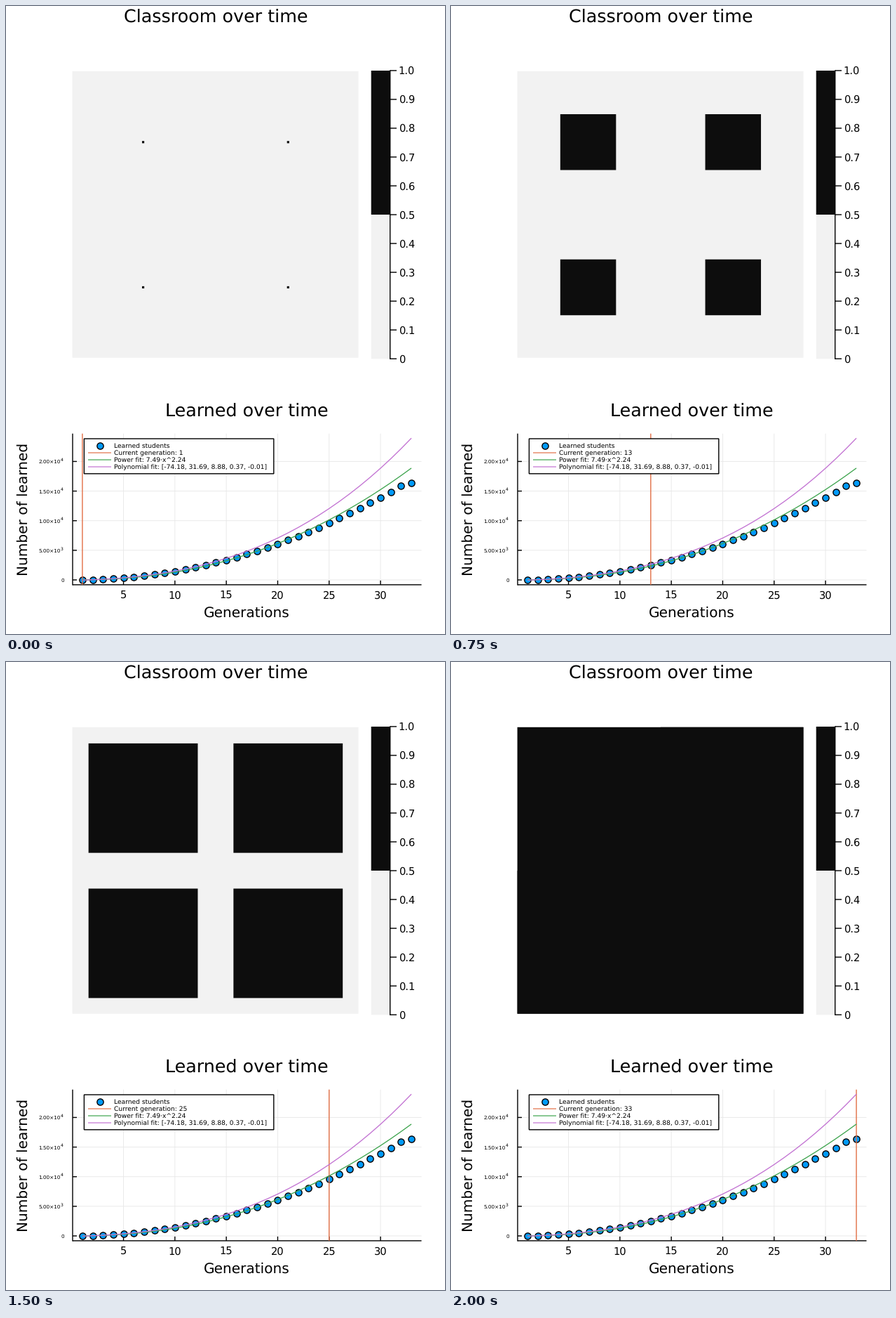
Write a matplotlib script that moves like this. It is 626 by 894 pixels and loops after 2060 ms.

```python
import numpy as np
import matplotlib.pyplot as plt
from matplotlib.animation import FuncAnimation
from matplotlib.patches import Rectangle

W, H, LOOP = 626, 894, 2060
GENS, CELLS = 33, 128
PX = 0.72  # points per pixel at 100 dpi

DARK, LIGHT = "#0d0d0d", "#f2f2f2"
BLUE, ORANGE, GREEN, PURPLE = "#009afa", "#e26f46", "#3da44d", "#c271d2"
TITLE, GUIDE, TICK, LEGEND, SMALL = 25.4, 20.1, 14.6, 9.1, 7.3

plt.rcParams.update({"font.family": "DejaVu Sans", "text.hinting": "none"})
fig = plt.figure(figsize=(W / 100, H / 100), dpi=100, facecolor="white")
ax = fig.add_axes([0, 0, 1, 1])
ax.set_xlim(0, W)
ax.set_ylim(H, 0)
ax.axis("off")


def line(xs, ys, color="black", width=1.4, z=2):
    return ax.plot(xs, ys, color=color, lw=width * PX, zorder=z,
                   snap=False, solid_capstyle="butt")[0]


def box(x0, y0, x1, y1, color, z=1, **kw):
    kw.setdefault("lw", 0)
    return ax.add_patch(Rectangle((x0, y0), x1 - x0, y1 - y0, fc=color,
                                  zorder=z, snap=False, **kw))


def text(x, y, s, size, ha="center", z=9):
    return ax.text(x, y, s, fontsize=size * PX, ha=ha, va="baseline", zorder=z)


def dots(xs, ys, z):
    ax.scatter(xs, ys, s=(9.2 * PX) ** 2, c=BLUE, edgecolors="black",
               linewidths=1.4 * PX, zorder=z, snap=False)


# Classroom heatmap; the outer cells reach slightly past the grid
def span(center, half, origin):
    lo, hi = np.clip([center - half, center + half], -0.25, CELLS)
    return origin + 3.18 * lo, 3.18 * (hi - lo)


text(299.5, 23, "Classroom over time", TITLE)
box(94.6, 92.8, 502.5, 500.7, LIGHT)
centers = [(cx, cy) for cx in (31.5, 96.5) for cy in (31.5, 96.5)]
squares = [box(0, 0, 0, 0, DARK, 2) for _ in centers]

# Colour bar
BAR = 547.7
box(520.7, 92, BAR, 297, DARK)
box(520.7, 297, BAR, 502.3, LIGHT)
line([BAR, BAR], [91.4, 502.9])
for i in range(11):
    y = 502.2 - 41.03 * i
    line([BAR, 557], [y, y])
    text(559.6, y + 5.3, f"{i / 10:.1f}" if i else "0", TICK, "left")


# Learned students chart
def gx(g):
    return 94.25 + 14.66 * np.asarray(g, float)


def gy(n):
    return 817 - 0.00843 * np.asarray(n, float)


LEFT, RIGHT, TOP, BOTTOM = 95, 592.5, 608.7, 823.9

text(343, 584, "Learned over time", TITLE)
text(343.5, 870, "Generations", GUIDE)
ax.text(31, 716, "Number of learned", fontsize=GUIDE * PX, rotation=90,
        rotation_mode="anchor", ha="center", va="baseline")

for g in range(5, 31, 5):
    x = gx(g)
    line([x, x], [TOP, BOTTOM], "#e8e8e8", 0.9, 1)
    line([x, x], [BOTTOM, BOTTOM - 6])
    text(x, 844, str(g), TICK)

for n in range(0, 20001, 5000):
    y = gy(n)
    line([LEFT, RIGHT], [y, y], "#e8e8e8", 0.9, 1)
    line([LEFT, LEFT + 6], [y, y])
    if n:
        power = int(np.log10(n))
        text(78, y + 3, f"{n / 10 ** power:.2f}×10", SMALL, "right")
        text(78, y - 0.3, str(power), 6, "left")
    else:
        text(83, y + 2.8, "0", SMALL, "right")

line([LEFT, LEFT], [TOP, BOTTOM + 0.7])
line([LEFT, RIGHT], [BOTTOM, BOTTOM])

gens = np.arange(1, GENS + 1)
learned = np.minimum(4 * (2 * gens - 1) ** 2, CELLS ** 2)
dots(gx(gens), gy(learned), 3)
marker = line([0, 0], [TOP, BOTTOM], ORANGE, 1.4, 4)
line(gx(gens), gy(7.49 * gens ** 2.24), GREEN, 1.3, 5)
line(gx(gens), gy(-74.18 + 31.69 * gens + 8.88 * gens ** 2 + 0.37 * gens ** 3), PURPLE, 1.3, 6)

# Legend
box(111.4, 616, 381.8, 665.8, "white", 7, ec="black", lw=1.4 * PX)
rows = [
    ("Learned students", None),
    ("", ORANGE),
    ("Power fit: 7.49·x^2.24", GREEN),
    ("Polynomial fit: [-74.18, 31.69, 8.88, 0.37, -0.01]", PURPLE),
]
labels = []
for i, (label, color) in enumerate(rows):
    y = 626 + 10 * i
    if color:
        line([117, 150], [y, y], color, 1.2, 8)
    else:
        dots([133.5], [y], 8)
    labels.append(text(154.5, y + 3.3, label, LEGEND, "left"))


def update(i):
    g = i + 1
    for sq, (cx, cy) in zip(squares, centers):
        x, w = span(cx, g - 0.5, 95.4)
        y, h = span(cy, g - 0.5, 93.6)
        sq.set_bounds(x, y, w, h)
    # Overlap the quadrants once they meet, so no seam shows
    if g == GENS:
        squares[0].set_bounds(94.6, 92.8, 407.9, 407.9)
    marker.set_xdata([gx(g)] * 2)
    labels[1].set_text(f"Current generation: {g}")
    return [*squares, marker, labels[1]]


anim = FuncAnimation(fig, update, frames=GENS, interval=LOOP / GENS, repeat=True, repeat_delay=0)
plt.show()
```
